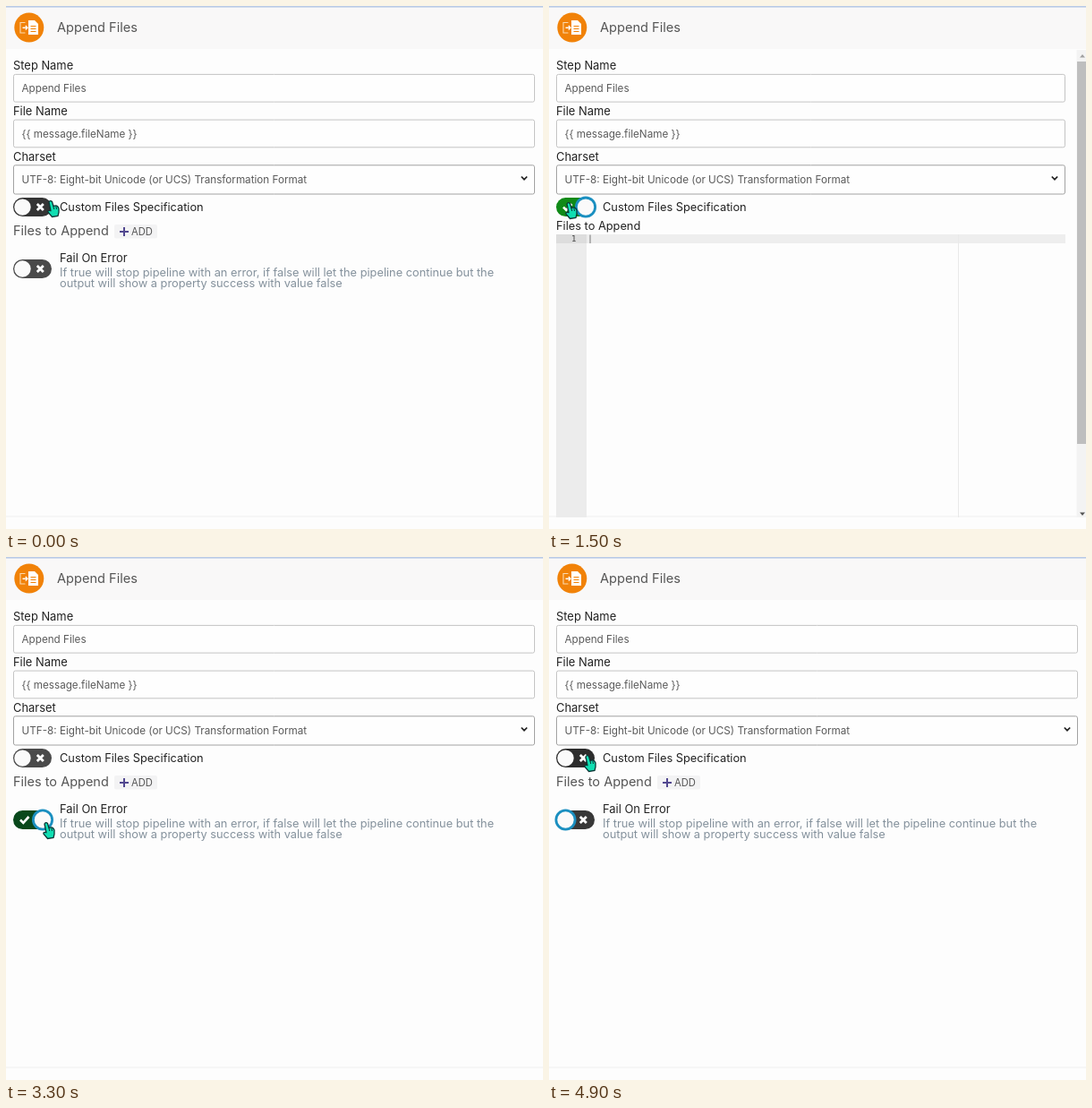
Animation of 600x584 px, one loop 5000 ms. Source, as an HTML page with a canvas:

```html
<!DOCTYPE html>
<html lang="en">
<head>
<meta charset="utf-8">
<title>Append Files</title>
<style>
html, body { margin: 0; width: 100%; height: 100%; overflow: hidden; background: #fdfdfd; }
canvas { display: block; width: 600px; height: 584px; }
</style>
</head>
<body>
<canvas id="stage"></canvas>
<script>
const W = 600, H = 584, LOOP = 5000, STEP = 100;
const SLIDE = 300, FADE = 200;
const canvas = document.getElementById('stage');
const ctx = canvas.getContext('2d');
const dpr = window.devicePixelRatio || 1;
canvas.width = W * dpr;
canvas.height = H * dpr;
ctx.scale(dpr, dpr);

// The pointer's stays over a switch; knobs, hover, focus and panel follow from them.
const visits = [
  { on: 'custom', x: 46, y: 217, enter: -60, leave: 200 },
  { on: 'custom', x: 44, y: 225, enter: 200, click: 600, leave: 900 },
  { on: 'custom', x: 18, y: 219, enter: 1500, click: 2100, leave: 2400 },
  { on: 'fail', x: 41, y: 296, enter: 2600, click: 3000, leave: 3400 },
  { on: 'fail', x: 21, y: 293, enter: 3900, click: 4400, leave: 4750 },
  { on: 'custom', x: 39, y: 221, enter: 4820, leave: LOOP + FADE }
];

const clamp = v => Math.min(1, Math.max(0, v));
const lerp = (a, b, k) => a + (b - a) * k;
const ease = k => (1 - Math.cos(Math.PI * k)) / 2;
const mix = (a, b, k) => a.map((v, i) => lerp(v, b[i], k));

function switchState(name, t) {
  const stays = visits.filter(v => v.on === name);
  const hover = stays.reduce((sum, v) =>
    sum + clamp((t - v.enter) / FADE) - clamp((t - v.leave) / FADE), 0);
  const clicks = stays.filter(v => v.click < t);
  const pos = clicks.reduce((p, v, i) =>
    p + (i % 2 ? -1 : 1) * clamp((t - v.click) / SLIDE), 0);
  const last = visits.filter(v => v.click < t).pop();
  return { pos, hover: clamp(hover), on: clicks.length % 2 === 1, focus: !!last && last.on === name };
}

function pointerAt(t) {
  const i = visits.findIndex(v => t < v.enter);
  if (i < 0) return visits[visits.length - 1];
  const a = visits[i - 1], b = visits[i];
  if (t <= a.leave) return a;
  const k = (t - a.leave) / (b.enter - a.leave);
  return {
    x: lerp(a.x, b.x, ease(k)) + 25 * Math.sin(Math.PI * k),
    y: lerp(a.y, b.y, ease(k))
  };
}

function rect(x, y, w, h, color) {
  ctx.fillStyle = color;
  ctx.fillRect(x, y, w, h);
}

function text(str, x, y, size, color) {
  ctx.font = `${size}px Inter, "Open Sans", sans-serif`;
  ctx.fillStyle = color;
  ctx.fillText(str, x, y);
}

function line(points, color, width) {
  ctx.beginPath();
  for (const p of points) ctx.lineTo(...p);
  ctx.strokeStyle = color;
  ctx.lineWidth = width;
  ctx.stroke();
}

function shape(points, color) {
  ctx.beginPath();
  for (const p of points) ctx.lineTo(...p);
  ctx.fillStyle = color;
  ctx.fill();
}

function disc(x, y, r, color) {
  ctx.beginPath();
  ctx.arc(x, y, r, 0, Math.PI * 2);
  ctx.fillStyle = color;
  ctx.fill();
}

function pill(x, y, w, h, r, color) {
  ctx.beginPath();
  ctx.roundRect(x, y, w, h, r);
  ctx.fillStyle = color;
  ctx.fill();
}

function header() {
  rect(0, 0, W, 48, '#f9f8f8');
  rect(0, 0, W, 1.6, '#b9cae6');
  disc(25.8, 24.1, 16.5, '#f18208');
  line([[21.5, 18.5], [16, 18.5], [16, 30], [21.5, 30]], '#fbd9b0', 1.1);
  line([[18.5, 24.3], [24, 24.3]], '#fff', 1.5);
  line([[21.8, 22], [24, 24.3], [21.8, 26.6]], '#fff', 1.3);
  shape([[25, 16], [32, 16], [36, 20], [36, 32], [25, 32]], '#fff');
  for (let y = 22.5; y < 29; y += 3) line([[27.5, y], [33.5, y]], '#f18208', 1);
  text('Append Files', 57, 29, 14.6, '#555');
}

function form(right) {
  const rows = [
    ['Step Name', 'Append Files'],
    ['File Name', '{{ message.fileName }}'],
    ['Charset', 'UTF-8: Eight-bit Unicode (or UCS) Transformation Format']
  ];
  rows.forEach(([label, value], i) => {
    const y = 76.4 + 50.7 * i, select = i === 2;
    text(label, 8, y - 5, 12.9, '#222');
    pill(8.5, y, right - 9, select ? 32.2 : 30.7, 2, '#fefefe');
    ctx.strokeStyle = select ? '#a2a2a2' : '#c4c4c4';
    ctx.lineWidth = 1;
    ctx.stroke();
    text(value, 17.5, y + 20, 11.7, '#5a5a5a');
  });
  const x = right - 12;
  line([[x - 3.2, 190.5], [x, 193.7], [x + 3.2, 190.5]], '#222', 1.7);
  text('Custom Files Specification', 60, 229, 12.8, '#222');
}

function drawSwitch(cy, { pos, hover, focus }) {
  const off = mix([74, 74, 74], [0, 0, 0], hover);
  const on = mix([16, 138, 24], [9, 72, 27], hover);
  pill(8, cy - 10.5, 43, 21, 10.5, `rgb(${mix(off, on, clamp(pos * 3)).join()})`);
  ctx.globalAlpha = 1 - pos;
  for (const s of [-1, 1]) line([[34.8, cy - 3.5 * s], [41.8, cy + 3.5 * s]], '#fff', 2.8);
  ctx.globalAlpha = pos;
  line([[16, cy], [19.3, cy + 3.3], [25.5, cy - 3.5]], '#fff', 2.6);
  ctx.globalAlpha = 1;
  const x = 18.5 + 22.5 * pos;
  if (focus) disc(x, cy, 12, '#1a8fc0');
  disc(x, cy, 9.2, '#fafafa');
}

function fileList() {
  text('Files to Append', 8, 256, 14.5, '#555');
  pill(121, 244, 48, 15.5, 2, '#f3f3f4');
  line([[127, 252], [137, 252]], '#51478f', 2);
  line([[132, 247], [132, 257]], '#51478f', 2);
  text('ADD', 140, 256, 11.2, '#555');
  text('Fail On Error', 60, 286, 12.9, '#222');
  text('If true will stop pipeline with an error, if false will let the pipeline continue but the', 60, 301.7, 12.8, '#84919c');
  text('output will show a property success with value false', 60, 313.7, 12.8, '#84919c');
}

function editor() {
  text('Files to Append', 8, 249.5, 12.8, '#222');
  rect(8, 255, 34, 316, '#ececec');
  rect(8, 255, 34, 10, '#dddddd');
  rect(42, 255, 535, 10, '#eeeeee');
  rect(457, 255, 1, 316, '#e9e9e9');
  ctx.font = '9px "DejaVu Sans Mono", monospace';
  ctx.fillStyle = '#444';
  ctx.fillText('1', 25, 263.3);
  rect(45.5, 255.5, 1, 9.5, '#777');
  rect(589.5, 49, 10.5, 522, '#f3f3f3');
  rect(590, 62, 10, 427, '#bebebe');
  shape([[593, 57.5], [599, 57.5], [596, 54]], '#a0a0a0');
  shape([[593, 565.5], [599, 565.5], [596, 569]], '#555');
}

function hand({ x, y }) {
  const dark = '#0c3535';
  ctx.save();
  ctx.translate(x, y);
  ctx.beginPath();
  ctx.moveTo(2, 2);
  ctx.quadraticCurveTo(3.5, -.5, 5.5, 1.5);
  ctx.lineTo(7, 6.5);
  ctx.quadraticCurveTo(11.5, 4.5, 13, 9);
  ctx.lineTo(13, 13.5);
  ctx.lineTo(12, 17.5);
  ctx.lineTo(5.5, 18.5);
  ctx.lineTo(1, 13.2);
  ctx.quadraticCurveTo(.2, 10.8, 3.9, 11.5);
  ctx.closePath();
  ctx.fillStyle = '#10deb2';
  ctx.fill();
  ctx.strokeStyle = dark;
  ctx.lineWidth = 1.3;
  ctx.stroke();
  for (const fx of [7, 9.8]) line([[fx, 6.5], [fx + .7, 10]], dark, 1);
  ctx.restore();
}

function draw(t) {
  const custom = switchState('custom', t);
  rect(0, 0, W, H, '#fdfdfd');
  header();
  rect(0, 569, W, 2, '#f6f6f6');
  form(custom.on ? 577 : 591);
  if (custom.on) {
    editor();
  } else {
    fileList();
    drawSwitch(293.5, switchState('fail', t));
  }
  drawSwitch(224.6, custom);
  hand(pointerAt(t));
}

const start = performance.now();
function tick() {
  const t = (performance.now() - start) % LOOP;
  draw(Math.floor(t / STEP) * STEP);
  requestAnimationFrame(tick);
}
tick();
</script>
</body>
</html>
```
